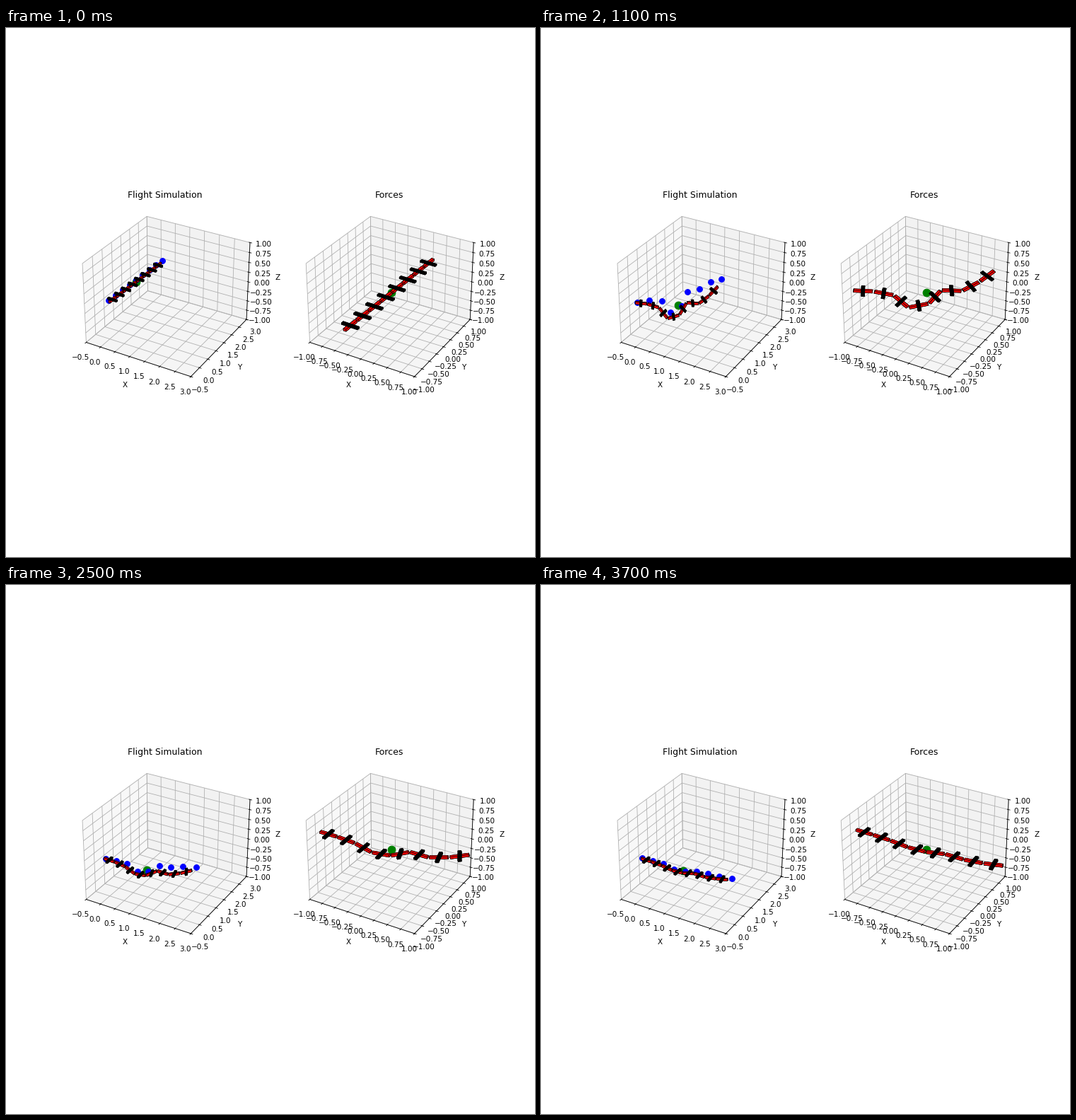
Write a matplotlib script that moves like this. It is 748x748 px and loops after 4300 ms.

```python
from itertools import product

import numpy as np
import matplotlib.pyplot as plt
from matplotlib.animation import FuncAnimation
from mpl_toolkits.mplot3d.art3d import Poly3DCollection

SIZE, INCHES = 748, 10
FRAMES, INTERVAL = 43, 100
LAST_STEP = 37
START_YAW = 88
PEAK_STEP = 9

# Half sizes of a module's two bars: along, across and normal to the chain.
RED_HALF = (0.157, 0.025, 0.025)
BLACK_HALF = (0.025, 0.15, 0.018)

# How slowly each link turns, and how far it pitches at mid-swing.
LAG = np.array([11, 10, 5, 12, 19, 11, 17, 22])
MODULE_SWING = np.array([-6, -15, -40, 12, 50, -5, 25, 30])
JOINT_SWING = np.array([8, 0, -42, 25, 62, 12, 18, 0])
MODULE_SPACING, JOINT_SPACING = 0.35, 0.36

SIGNS = np.array(list(product((-1, 1), repeat=3)))
FACES = np.array([[0, 1, 3, 2], [4, 5, 7, 6], [0, 1, 5, 4],
                  [2, 3, 7, 6], [0, 2, 6, 4], [1, 3, 7, 5]])


def decay(step, lag, power=1.0):
    return np.exp(-(step / lag) ** power)


def surge(step):
    """Rise from 0 to 1 at the peak, then die away."""
    u = step / PEAK_STEP
    return u * np.exp(1 - u)


def link_axes(step, swing):
    """Unit vectors along, across and normal to every link."""
    yaw = np.radians(START_YAW * decay(step, LAG, 1.5))
    pitch = np.radians(swing * surge(step))
    along = np.stack([np.cos(yaw) * np.cos(pitch),
                      np.sin(yaw) * np.cos(pitch), np.sin(pitch)], axis=1)
    across = np.stack([-np.sin(yaw), np.cos(yaw), 0 * yaw], axis=1)
    return np.stack([along, across, np.cross(along, across)], axis=1)


def modules(step):
    """Module centres about their mean, with their axes."""
    axes = link_axes(step, MODULE_SWING)
    along = axes[:, 0]
    centres = MODULE_SPACING * (np.cumsum(along, axis=0) - along / 2)
    return centres - centres.mean(axis=0), axes


def joint_points(step):
    base = surge(step) * np.array([[-0.1, -0.2, 0]])
    links = JOINT_SPACING * link_axes(step, JOINT_SWING)[:, 0]
    return np.cumsum(np.vstack([base, links]), axis=0)


def mass_centre(step):
    return np.array([1.4 - 1.29 * decay(step, 9.5),
                     -0.07 + 1.4 * decay(step, 8.5, 1.3), 0])


def boxes(centres, axes, half):
    corners = centres[:, None] + (SIGNS * half) @ axes
    return corners[:, FACES].reshape(-1, 4, 3)


def make_panel(position, title, low, high):
    ax = fig.add_subplot(1, 2, position, projection="3d",
                         computed_zorder=False)
    centres, axes = modules(0)
    bars = []
    for half, color, width, order in ((RED_HALF, "red", 0.6, 5),
                                      (BLACK_HALF, "black", 1, 6)):
        bar = Poly3DCollection(boxes(centres, axes, half), facecolors=color,
                               edgecolors="black", linewidths=width,
                               zorder=order)
        ax.add_collection3d(bar)
        bars.append((bar, half))
    dot, = ax.plot([0], [0], [0], "go", markersize=10.3, zorder=3)
    ax.set(title=title, xlabel="X", ylabel="Y", zlabel="Z",
           xlim=(low, high), ylim=(low, high), zlim=(-1, 1))
    return ax, bars, dot


fig = plt.figure(figsize=(INCHES, INCHES), dpi=SIZE / INCHES)
flight_ax, flight_bars, flight_dot = make_panel(
    1, "Flight Simulation", -0.5, 3)
_, force_bars, _ = make_panel(2, "Forces", -1, 1)
joints, = flight_ax.plot(*joint_points(0).T, "bo", markersize=7.5, zorder=4)
flight_ax.set(xlim=(-0.5, 3), ylim=(-0.5, 3), zlim=(-1, 1))


def update(frame):
    step = min(frame, LAST_STEP)
    centres, axes = modules(step)
    centre = mass_centre(step)
    for bar, half in force_bars:
        bar.set_verts(boxes(centres, axes, half))
    for bar, half in flight_bars:
        bar.set_verts(boxes(centres + centre, axes, half))
    flight_dot.set_data_3d(*centre[:, None])
    joints.set_data_3d(*joint_points(step).T)
    return []


anim = FuncAnimation(fig, update, frames=FRAMES, interval=INTERVAL,
                     repeat=True, repeat_delay=0, blit=False)
plt.show()
```
